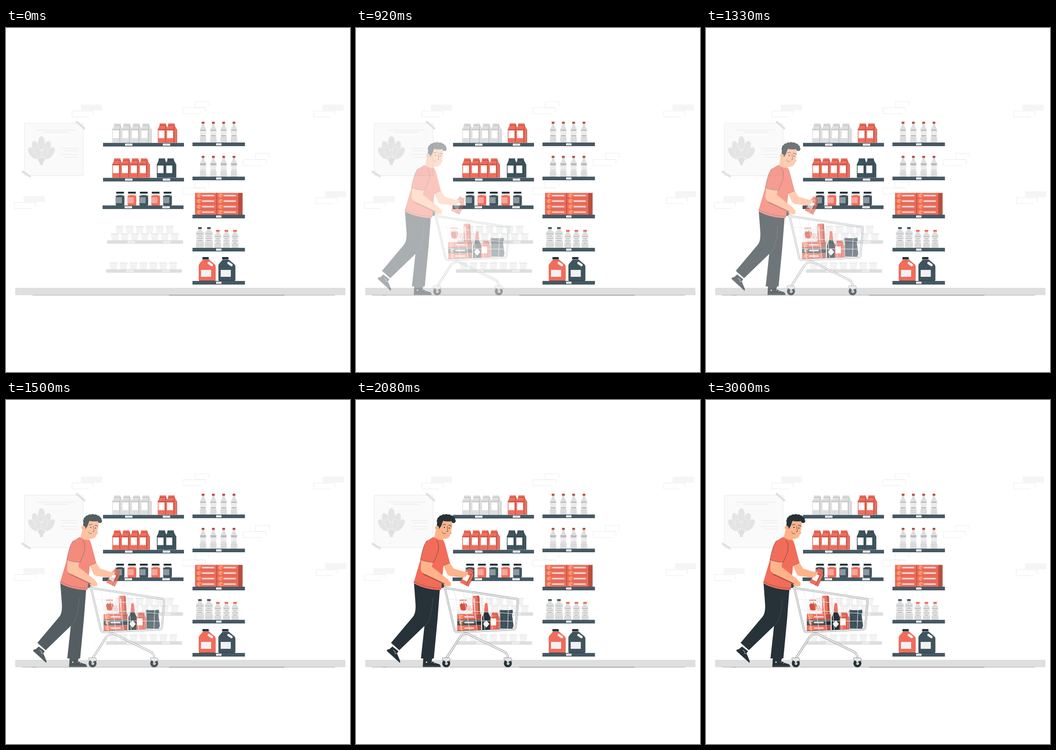
An HTML page for the animation above (3040 ms loop, 748 by 748 pixels).

```html
<!DOCTYPE html>
<html lang="en">
<head>
<meta charset="utf-8">
<title>Shopper</title>
<style>
html, body { margin: 0; width: 100%; height: 100%; overflow: hidden; background: #fff; }
svg { display: block; width: 100vw; height: 100vh; }
</style>
</head>
<body>
<svg id="stage" viewBox="0 0 748 748" fill="none" stroke-linejoin="round" stroke-linecap="round">
  <g id="wall"></g>
  <g id="goods"></g>
  <g id="floor">
    <rect x="20" y="565" width="718" height="16" fill="#dfdfdf"/>
    <path id="shade" d="M35 581H66" stroke="#999" stroke-width=".8" stroke-linecap="butt"/>
    <path d="M58 581H715" stroke="#999" stroke-width=".8"/>
    <path d="M355 581H605" stroke="#7c7c7c" stroke-width=".9"/>
  </g>
  <g id="shopper" opacity="0"></g>
</svg>
<script>
const RED = '#f26c5a', DEEP = '#b5503f', NAVY = '#40545e', INK = '#263238', BAR = '#455a64';
const GREY = '#e0e0e0', PALE = '#f5f5f5', SKIN = '#ffb38b';
const $ = id => document.getElementById(id);

const rect = (x, y, w, h, fill, r = 0, more = '') =>
  `<rect x="${x}" y="${y}" width="${w}" height="${h}" rx="${r}" fill="${fill}" ${more}/>`;
const area = (d, fill, more = '') => `<path d="${d}" fill="${fill}" ${more}/>`;
const line = (d, color = INK, w = 0.7, more = '') =>
  `<path d="${d}" stroke="${color}" stroke-width="${w}" ${more}/>`;
const dot = (x, y, r, fill, more = '') => `<circle cx="${x}" cy="${y}" r="${r}" fill="${fill}" ${more}/>`;
const at = (x, y, body, turn = 0, size = 1) =>
  `<g transform="translate(${x} ${y}) rotate(${turn}) scale(${size})">${body}</g>`;

const repeat = (n, draw) => Array.from({ length: n }, (_, i) => draw(i)).join('');
const row = (x, y, step, n, draw) => repeat(n, i => at(x + i * step, y, draw(i)));
const polar = (x, y, turn, r) => [x + r * Math.sin(turn), y - r * Math.cos(turn)];

// Shape mirrored about x = 0, from [half width, y] pairs.
function turned(profile, fill, more) {
  const left = profile.map(([w, y]) => [-w, y]).reverse();
  return area(`M${[...profile, ...left].join('L')}Z`, fill, more);
}

// Tapered limb through [x, y, radius] joints.
function limb(joints, fill) {
  return joints.map(([x, y, r], i) => {
    if (!i) return dot(x, y, r, fill);
    const [px, py, pr] = joints[i - 1], a = Math.atan2(y - py, x - px) + Math.PI / 2;
    const c = Math.cos(a), s = Math.sin(a);
    return area(`M${px + pr * c} ${py + pr * s}L${x + r * c} ${y + r * s}L${x - r * c} ${y - r * s}L${px - pr * c} ${py - pr * s}Z`, fill) +
      dot(x, y, r, fill);
  }).join('');
}

// Wall
const outline = (x, y, w) => line(`M${x + w - 9} ${y + 13}H${x}V${y}H${x + w}V${y + 9}`, '#e9e9e9', 0.9);
const solidPair = (x, y) => rect(x, y, 46, 13, PALE) + outline(x - 19.5, y + 14, 46);
const hollowPair = (x, y) => outline(x, y, 30) + outline(x - 27, y + 13.5, 50);

function leaf(turn, reach, rx, ry) {
  const [x, y] = polar(77, 297, turn, reach);
  return line(`M${x} ${y}Q${(x + 77) / 2} 281 77 297`, '#dcdcdc', 2) +
    at(x, y, `<ellipse rx="${rx}" ry="${ry}" fill="#e4e4e4" stroke="#f2f2f2" stroke-width=".7"/>`, turn * 57.3);
}

function poster() {
  return rect(40.5, 207, 127, 114, '#fafafa', 0, 'stroke="#e3e3e3" stroke-width=".8"') +
    line('M67 222H150M82 226.5H136M120 262H156M126 267H154M120 275H156M126 281H156', '#e2e2e2', 0.9) +
    repeat(5, i => leaf((i - 2) * 0.32, 47 - 8 * Math.abs(i - 2), 7.5, 15)) +
    repeat(2, i => leaf((i - 0.5) * 0.55, 28, 6, 12)) +
    area('M73 282H82L80 298H74Z', GREY) +
    line('M152.5 203L171.5 219.5M34.5 311.5L53.5 323.5', GREY, 4.5, 'stroke-linecap="butt"');
}

$('wall').innerHTML = solidPair(163, 166.5) + solidPair(38, 365.5) + solidPair(688.5, 166.5) +
  solidPair(694, 355) + hollowPair(411.5, 160) + hollowPair(542.5, 272.5) + hollowPair(411, 334.5) + poster();

// Shelves
function shelf(x, y, w, tags, faint) {
  return rect(x, y, w, 7.6, faint ? '#dedede' : BAR) +
    (faint ? '' : line(`M${x} ${y + 7}h${w}`, '#34464f', 1, 'stroke-linecap="butt"')) +
    tags.map(tx => rect(x + tx, y + 1.6, tags.length > 1 ? 16 : 11.5, 4.6, faint ? '#f0f0f0' : '#fff') +
      line(`M${x + tx + 4} ${y + 4}h${tags.length > 1 ? 7 : 4}`, faint ? GREY : '#888', 0.8)).join('');
}

function carton(fill, edge = INK) {
  return area('M0 0V-29L4 -38V-42H18V-38L23 -29V0Z', fill) +
    line('M4 -38H18M0 -29H16.5L18 -38M16.5 -29V0M23 -29V0', edge, 0.5) + rect(1.5, -26.5, 13, 16.5, '#fff');
}

const jar = color =>
  turned([[8, -24], [9.5, -20], [9.5, -2], [8, 0]], color) + rect(-8.5, -30, 17, 4, INK, 1) +
  turned([[8, -26], [11, -23], [8, -21], [4, -22.5]], '#e4e4e4') +
  rect(-9, -18, 13, 13, '#fff', 0, 'opacity=".4"');

const cup = () => rect(-8.8, -15.5, 17.5, 3, '#ededed', 1) +
  turned([[7.8, -12.5], [5.8, 0]], '#f3f3f3', 'stroke="#ebebeb" stroke-width=".6"');

const bottle = band =>
  turned([[2.5, -41], [3, -36], [6.5, -30], [7, -25], [5.8, -20], [5.8, -14], [7, -10], [7, -1], [6, 0]], '#dedede') +
  rect(-3, -45.5, 6, 4.5, DEEP, 0.6) + rect(-6, -25, 12, 9, '#ececec') +
  line(band, '#666', 0.7) + line('M-6 -9H6M-6 -5H6', '#ccc', 0.7);

function flask(w, h, cap) {
  const r = w / 2;
  return turned([[3.5, 4 - h], [4, 8 - h], [r - 1, 10 - h], [r, 14 - h], [r - 1, -17], [r, -10], [r, -1], [r - 1, 0]], '#dcdcdc') +
    rect(-4, -h, 8, 4, cap, 1) + rect(1 - r, 14 - h, w - 2, 16, '#ededed') +
    repeat(4, i => line(`M${2 - r + i % 2 * 2} ${15 - h + i * 4.5}H${r - 2 - i % 2 * 2}`, '#777', 0.8)) +
    line(`M${1 - r} -6H${r - 1}`, '#c4c4c4', 0.7);
}

const pack = (w, fill = RED) => rect(0, 0, w, 11.8, fill) + line(`M0 11.8H${w}`, '#7d382f', 0.8) +
  dot(9, 6, 4.7, '#ff9c70') + area('M9 6L14 5 12 10Z', fill) + rect(15, 4.2, w - 20, 3.4, '#ecdcd9', 1.7);

const jug = color =>
  area('M9 -46H23L35 -36Q37 -34 37 -31V-3Q37 0 34 0H3Q0 0 0 -3V-33Q0 -36 2 -38Z', color) +
  rect(8, -52, 14, 5, INK, 1.5) + line('M22 -39L28.5 -34.5', '#f1f1f1', 5.2) +
  rect(5, -24, 22, 15, '#f1f1f4') + line('M1 -.5H36M9 -46H23', INK, 0.6);

const plain = () => carton('#dedede', '#888'), red = () => carton(RED), navy = () => carton(NAVY);

$('goods').innerHTML =
  row(231, 249.5, 20.7, 4, plain) + row(330, 249.5, 18.7, 2, red) +
  row(231, 325.5, 19.5, 4, red) + row(328, 325.5, 19, 2, navy) +
  row(248, 386, 25.8, 5, i => jar(i % 2 ? RED : NAVY)) +
  row(247, 445.5, 21.8, 6, cup) + row(236.7, 461.5, 21.7, 7, cup) + row(234, 525, 21.6, 7, cup) +
  row(428.5, 249.2, 22.4, 4, () => bottle('M-5 -27H5M-5 -15H5')) +
  row(428.5, 323.4, 22.4, 4, () => bottle('M-6 -28H6M-5 -26Q0 -24 5 -26')) +
  rect(505, 358.5, 9.5, 47.5, DEEP) +
  repeat(8, i => at(411 + i % 2 * 47, 358.5 + (i >> 1) * 12, pack(47))) + line('M458 358.5V406', '#7d382f', 0.8) +
  row(421.7, 478, 19.5, 2, () => flask(17.5, 45, NAVY)) + row(460.6, 478, 18.7, 3, () => flask(15, 39, RED)) +
  row(419, 550, 42.8, 2, i => jug(i ? NAVY : RED)) +
  repeat(3, i => shelf(i < 2 ? 211 : 210, 249.8 + i * 76 - (i > 1 ? 16 : 0), 176, [48, 130])) +
  shelf(220, 461.5, 165, [44, 122], true) + shelf(217.5, 524.6, 165, [44, 122], true) +
  [249, 323.2, 406, 478, 550].map(y => shelf(405.5, y, 114, [51.5])).join('');

// Shopper
function body() {
  const farArm = limb([[195, 355, 7.5], [205, 374, 9], [234, 380, 6]], SKIN);
  const carried = at(225, 397, carton(RED), 26, 0.87) + limb([[234, 380, 5], [240, 376, 2.8]], SKIN);
  const backLeg = area('M125 399L128 440Q130 462 123 471L75 528 93 544 149 490 170 430Z', INK);
  const frontLeg = area('M125 399Q150 412 181 413L176 478 168 562H140L148 488Z', INK);
  const backShoe = area('M78 536L91 546 88 551 95 568 94 571.5 66 546Q65 542 71 542Z', INK) +
    line('M66 545L94 571', '#5a676d', 0.8) + line('M80 544L85 548M83 550L87 552', '#fff', 0.9);
  const frontShoe = area('M145 562H165L163 567Q172 573 179 574 183 576 183 580.5H144Z', INK) +
    line('M144 578.5H183', '#5a676d', 0.7) + dot(152, 570, 1.5, '#fff') + line('M163 570L167 567.5M168 573L171 570.5', '#fff', 0.9);
  const shirt = area('M167 298Q150 306 147 322L139 347 124 398Q150 413 184 413L189 360 203 354 193 316Q190 304 185 302Z', RED) +
    line('M125 395Q150 409 184 409.5M189 360L203 354', INK, 0.5);
  const elbow = [151, 367, 11.5], wrist = [193, 393, 6];
  const shadow = limb([elbow, wrist].map(([x, y, r]) => [x + 1, y + 4, r - 1]), '#a84b42');
  const nearArm = limb([[154, 347, 13], elbow, wrist, [201, 400, 4.5]], SKIN) +
    repeat(3, i => limb([[194 + i * 4, 398, 2.5], [193 + i * 5, 405 - i, 2]], SKIN));
  const sleeve = area('M153 306C146 314 142 332 139 347Q153 353 168 352.5L177 331 180 312Q170 296 153 306Z', RED) +
    line('M153 306C146 314 142 332 139 347Q153 353 168 352.5L177 331Q181 313 174 305', INK, 0.6);
  return farArm + carried + backShoe + backLeg + frontShoe + frontLeg +
    line('M166 430Q165 460 157 480L149 491', '#52616a', 0.6) + shirt + shadow + nearArm + sleeve;
}

function head() {
  const curls = repeat(9, i => {
    const a = Math.PI * (1 + i / 8);
    return dot(195 + 16 * Math.cos(a), 263 + 10.5 * Math.sin(a), 4.6, INK);
  });
  return area('M174 276L169 298Q176 304 185 304.5L192 301 194 290Z', SKIN) +
    area('M176 270Q181 257 198 258 209 259 208 272L205 290Q202 301 193 302 183 300 179 288Z', SKIN) +
    area('M175 279Q173 262 182 256H208L211 263Q198 265 188 263L184 274 180 280Z', INK) + curls +
    dot(175, 278, 4.4, SKIN) + line('M173 276Q177 276 176 280', '#c97862', 0.6) +
    dot(191, 277, 1.3, INK) + dot(201.5, 278.5, 1.3, INK) +
    line('M187.5 272Q191 269.5 194 271M200 272.5Q203 271.5 206 274.5', INK, 1.1) +
    line('M197 274L198.5 286 195.5 286.5M186 287Q188 292 193 290.5', INK, 0.8) + dot(205, 289, 1.8, '#f79b82');
}

function groceries() {
  const stack = row(219, 465.5, 0, 1, () => repeat(3, i => at(0, i * 12.3,
    pack(42, i === 1 ? NAVY : RED) + rect(42, 0, 10, 11.8, i === 1 ? INK : DEEP))));
  const pepper = rect(222, 437, 27, 27, '#f3f3f3', 3) + rect(224, 434, 15, 3, RED, 1) +
    at(232.5, 450, turned([[0, -6], [5, -8.5], [8, -4], [6, 6], [0, 9]], '#d94f3f') + line('M0 -6L1 -10', INK, 1)) +
    repeat(3, i => dot(...polar(244.5, 454, i * 2.1, 4), 2.5, '#fff', `stroke="${RED}" stroke-width=".9"`));
  const tall = area('M252 426L265 425 268 465H253Z', RED) + area('M263 425L267 427 269 465H265Z', DEEP) +
    line('M256 432L257 458', '#f7d3cc', 2.5);
  const wine = at(282, 500, turned([[3.5, -47], [4.5, -37], [9, -28], [9, 0]], INK) +
    turned([[2.5, -59], [4.5, -40]], RED) + turned([[0, -21], [7, -13], [0, -5]], '#f0f0f0'));
  const bag = at(325, 497, turned([[6, -40], [14, -41], [15, -36], [13, -31], [16.5, -6], [14, 0]], NAVY) +
    line('M-13 -34Q0 -29 13 -34M-8 -26L-10 -9M7 -27L10 -11M-3 -17L4 -5', INK, 0.9));
  return pepper + tall + stack + bag + wine + at(290.5, 499, carton(RED), 0, 0.9);
}

// Point inside the basket: u runs along, v runs down.
const basketPoint = (u, v) => {
  const top = [192 + 159 * u, 409 + 24 * u], low = [213 + 132 * u, 503 - 6 * u];
  return top.map((p, i) => p + (low[i] - p) * v);
};

function cart() {
  const wires = repeat(7, i => `M${basketPoint((i + 1) / 8, 0)}L${basketPoint((i + 1) / 8, 1)}`) +
    repeat(3, i => `M${basketPoint(0, (i + 1) / 4)}L${basketPoint(1, (i + 1) / 4)}`);
  const tube = (d, w) => line(d, '#59666c', w) + line(d, '#eaeaea', w - 1);
  const wheel = () => dot(0, 0, 8.7, INK) + dot(0.5, 0.5, 3, '#dedede') +
    area('M-8 -12H7L9 -6 2 -4 0 1 -3 -5 -8 -7Z', '#e6e6e6', 'stroke="#59666c" stroke-width=".6"');
  return groceries() + line(wires, '#e8e8e8', 1.1) +
    tube('M195 562L224 517Q231 506 243 509L320 547Q329 551 329 561', 4.2) +
    tube('M188 404L192 409 213 500Q214 505 220 504.5L340 499Q345.5 498.5 346 494L351 437Q351.5 433 348 432.5L190 408.5', 3.8) +
    line('M183 401L186 404', '#37474f', 9.5) + row(195, 572.5, 134, 2, wheel);
}

$('shopper').innerHTML = cart() + body() + head();

// Motion
const LOOP = 3040, ENTER = 345, SETTLED = 1840;

function slide(t) {
  if (t < SETTLED) return -30 * (SETTLED - t) / (SETTLED - ENTER);
  return 2 * Math.sin(Math.PI * (t - SETTLED) / (LOOP - SETTLED));
}

function draw(now) {
  const t = now % LOOP;
  const fade = Math.min(1, Math.max(0, (t - ENTER) / (SETTLED - ENTER - 20)));
  $('shade').style.display = t < 80 ? 'none' : '';
  $('shopper').setAttribute('opacity', fade.toFixed(3));
  $('shopper').setAttribute('transform', `translate(${slide(t).toFixed(2)} 0)`);
}

const start = performance.now();
function tick() {
  draw(performance.now() - start);
  requestAnimationFrame(tick);
}
tick();
</script>
</body>
</html>
```
